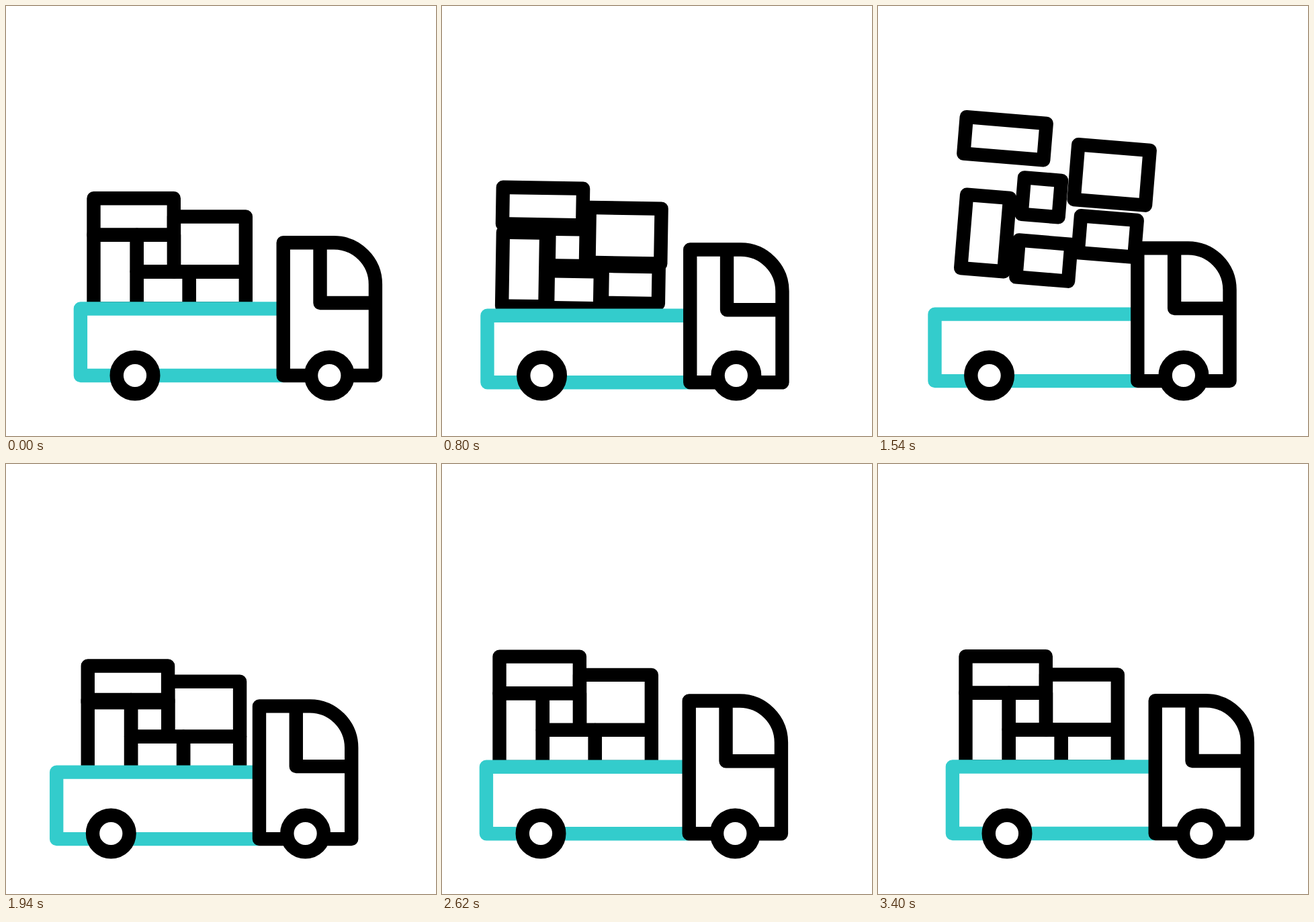
Recreate the animation shown at these times as an HTML page. Size 640x640 px, loop 3.62 s.

```html
<!DOCTYPE html>
<html lang="en">
<head>
<meta charset="utf-8">
<title>Delivery truck</title>
<style>
  html, body { margin: 0; width: 100%; height: 100%; overflow: hidden; background: #fff; }
  svg { display: block; width: 100%; height: 100%; }
  #stage { fill: #fff; stroke: #000; stroke-width: 20.4; stroke-linejoin: round; }
</style>
</head>
<body>
<svg viewBox="0 0 640 640">
  <g id="stage">
    <g id="boxes" fill="none"></g>
    <g id="body">
      <path d="M412 450.5H110.9V550H412" stroke="#33cccc"/>
      <path d="M412.7 352.2H488A62 62 0 0 1 549.9 414.2V550H412.7Z"/>
      <path d="M467.5 352.2V442H549.9" fill="none"/>
    </g>
    <g id="wheels">
      <circle cx="192" cy="550" r="27.3"/>
      <circle cx="481.3" cy="550" r="27.3"/>
    </g>
  </g>
</svg>
<script>
const LOOP = 3620, START = 200, END = 3400;
const LAUNCH = 740, PEAK = 1365, LAND = 1940, SETTLED = 2400;
const LIFT_BASE = 10.2, TILT = 5.1, SLIDE = 27;

// Resting centre-line edges, then the throw distance at the peak.
const boxes = [
  { x1: 130.5, y1: 286.2, x2: 249.8, y2: 340.8, dx: 0, dy: -138, dip: 4 },
  { x1: 130.5, y1: 340.8, x2: 194.8, y2: 450.5, dx: -2, dy: -74 },
  { x1: 194.8, y1: 340.8, x2: 250, y2: 395.5, dx: 24, dy: -102 },
  { x1: 250, y1: 313.5, x2: 356.8, y2: 395.5, dx: 50, dy: -123.5 },
  { x1: 194.8, y1: 395.5, x2: 272.8, y2: 450.5, dx: 15, dy: -59 },
  { x1: 272.8, y1: 395.5, x2: 356.8, y2: 450.5, dx: 30.5, dy: -98.4 }
];

const byId = id => document.getElementById(id);
const body = byId('body'), wheels = byId('wheels');
const progress = (t, a, b) => Math.min(1, Math.max(0, (t - a) / (b - a)));
const ease = p => p * p * (3 - 2 * p);
const between = (t, a, b) => ease(progress(t, a, b));

for (const box of boxes) {
  box.node = document.createElementNS('http://www.w3.org/2000/svg', 'rect');
  const width = box.x2 - box.x1, height = box.y2 - box.y1;
  const attrs = { x: -width / 2, y: -height / 2, width, height };
  for (const name in attrs) box.node.setAttribute(name, attrs[name]);
  byId('boxes').append(box.node);
}

function truckX(t) {
  return -51.4 * between(t, START, 1000) + 25.7 * between(t, 1000, 1600)
    - 25.7 * between(t, 1600, 2400) + 51.4 * between(t, 2400, END);
}

function bounce(t) {
  if (t < START || t > END) return 0;
  const phase = (t - START) % 400 / 200;
  return ease(phase < 1 ? phase : 2 - phase);
}

function lift(t) {
  if (t < LAUNCH || t > LAND) return 0;
  return t < PEAK
    ? 1 - (1 - progress(t, LAUNCH, PEAK)) ** 2
    : 1 - progress(t, PEAK, LAND) ** 2.1;
}

function slide(t) {
  const out = 1 - (1 - progress(t, LAUNCH, LAND)) ** 2.5;
  return SLIDE * (out - between(t, LAND, SETTLED));
}

function draw(t) {
  const x = truckX(t), bob = bounce(t), up = lift(t);
  body.setAttribute('transform', `translate(${x} ${10.3 * bob})`);
  wheels.setAttribute('transform', `translate(${x} 0)`);

  const flying = t > LAUNCH && t < LAND;
  const stackX = x + slide(t), stackY = flying ? LIFT_BASE : 13 * bob;
  const dip = Math.sin(Math.PI * progress(t, 1880, 2000));
  for (const box of boxes) {
    const cx = (box.x1 + box.x2) / 2 + stackX + box.dx * up;
    const cy = (box.y1 + box.y2) / 2 + stackY + box.dy * up + (box.dip || 0) * dip;
    box.node.setAttribute('transform', `translate(${cx} ${cy}) rotate(${TILT * up})`);
  }
}

const begin = performance.now();
function tick() {
  draw((performance.now() - begin) % LOOP);
  requestAnimationFrame(tick);
}
tick();
</script>
</body>
</html>
```
